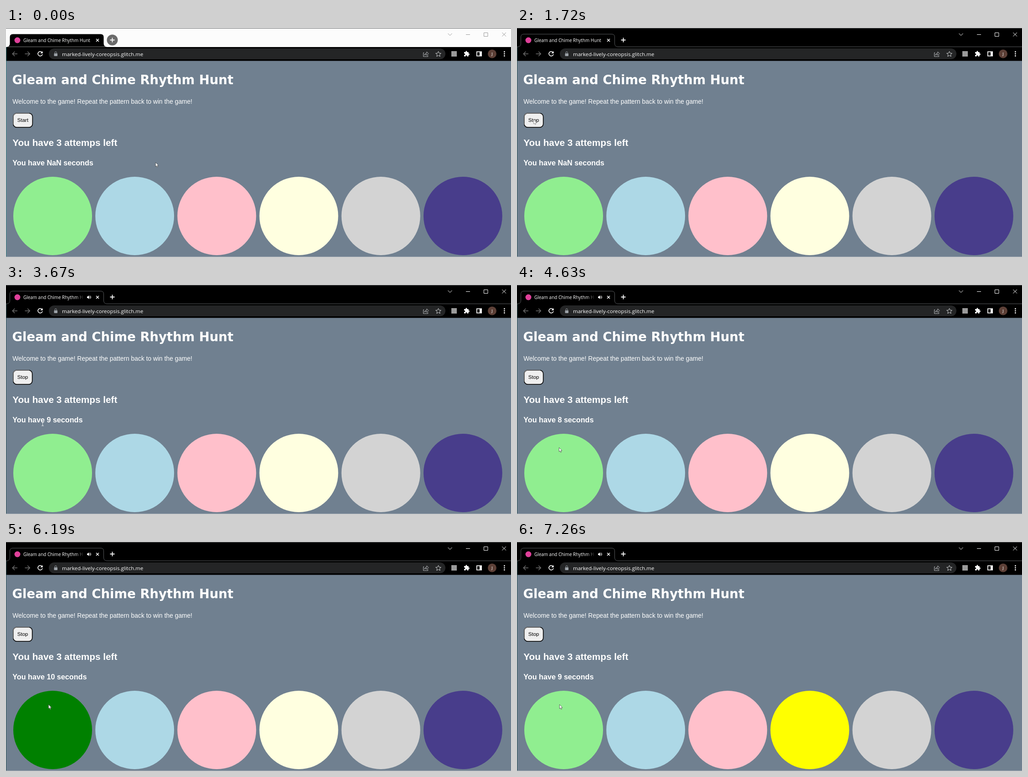
Recreate the animation shown at these times as an HTML page. Size 1109 px wide and 505 px high, loop 8 s.

```html
<!DOCTYPE html>
<html lang="en">
<head>
<meta charset="utf-8">
<title>Gleam and Chime Rhythm Hunt</title>
<style>
  html, body { margin: 0; width: 100%; height: 100%; overflow: hidden; background: #708090; }
  svg { display: block; width: 1109px; height: 505px; }
  text { white-space: pre; }
  .page { font-family: "Liberation Sans", Arial, sans-serif; fill: #fff; }
  .ui { font-family: "Open Sans", "Noto Sans", sans-serif; fill: #fff; }
  .line { fill: none; stroke: #fff; }
</style>
</head>
<body>
<svg viewBox="0 0 1109 505" xmlns="http://www.w3.org/2000/svg">
  <defs>
    <linearGradient id="fade" gradientUnits="userSpaceOnUse" x1="154" x2="171" y1="0" y2="0">
      <stop stop-color="#fff"/><stop offset="1" stop-color="#fff" stop-opacity="0"/>
    </linearGradient>
  </defs>
  <rect width="1109" height="505" fill="#708090"/>

  <!-- title bar -->
  <rect id="bar" width="1109" height="42"/>
  <path id="tab" d="M1 41.5Q8.500 41.500 8.500 34V20Q8.500 13.500 15 13.500H208Q214.500 13.500 214.500 20V34Q214.500 41.500 222 41.500" fill="#000"/>
  <rect width="1109" height="1" fill="#5c5f61"/>
  <circle cx="25" cy="27" r="6.500" fill="#e0409a"/>
  <text id="title" class="ui" x="38" y="30.500" font-size="9.940">Gleam and Chime Rhythm Hunt</text>
  <g id="sound">
    <path d="M178 25.300h2l2.600-2.500v8.400l-2.600-2.500h-2z" fill="#fff"/>
    <path class="line" d="M184 25q1.500 2 0 4M185.200 23.400q3 3.600 0 7.200" stroke-width=".9"/>
  </g>
  <path class="line" d="M198 24l6 6m0-6l-6 6" stroke-width="1.500"/>
  <circle id="disc" cx="233.500" cy="26.500" r="12" fill="#6b6b6b"/>
  <path class="line" d="M228.500 26.500h10m-5-5v10" stroke-width="1.800"/>
  <path id="controls" class="line" d="M970.500 12l4.500 4.500 4.500-4.500M1010 14.500h9M1049.500 10.500h8.500v8h-8.500zM1089.500 10l8.500 8.500m0-8.500l-8.500 8.500"/>

  <!-- toolbar -->
  <rect y="42" width="1109" height="31"/>
  <path id="seam" d="M0 41.500H1M222 41.500H1109" stroke="#55585b"/>
  <path d="M0 72.500H1109" stroke="#3a4048"/>
  <g class="line" stroke-width="1.400">
    <path d="M25 57H14.500m4.700-5l-5 5 5 5M41.500 57H52m-4.700-5l5 5-5 5" stroke="#6f6f6f"/>
    <path d="M79 53.600a5 5 0 1 0 1 4.200" stroke-width="1.600"/>
  </g>
  <path d="M80.500 51v5h-5z" fill="#fff"/>
  <rect x="94" y="45" width="871" height="24" rx="12" fill="#242526"/>
  <rect x="105.500" y="56" width="7.500" height="6" rx="1" fill="#9aa0a6"/>
  <path class="line" d="M107.200 56v-1.800a2 2 0 0 1 4 0V56" style="stroke:#9aa0a6"/>
  <text class="ui" x="123" y="61.500" font-size="11.500">marked-lively-coreopsis.glitch.me</text>
  <path class="line" d="M918 54.500h-1.500v8.500h10v-2.500M919 60q.5-4.500 5-4.500v-3l4 4-4 4v-2.500q-3.500 0-5 2z" style="stroke:#b8bbbe"/>
  <path class="line" d="M949.500 51.500l1.700 3.900 4.200.4-3.200 2.800 1 4.200-3.700-2.300-3.700 2.300 1-4.200-3.200-2.800 4.200-.4z" style="stroke:#d0d2d4"/>
  <rect x="978" y="51" width="12" height="12" fill="#9a9a9a"/>
  <path transform="translate(1004.800 50) scale(.58)" fill="#fff" d="M20.500 11H19V7c0-1.100-.9-2-2-2h-4V3.500a2.500 2.500 0 0 0-5 0V5H4c-1.100 0-2 .9-2 2v3.800h1.500a2.700 2.700 0 0 1 0 5.400H2V20c0 1.100.9 2 2 2h3.800v-1.500a2.700 2.700 0 0 1 5.400 0V22H17c1.100 0 2-.9 2-2v-4h1.500a2.500 2.500 0 0 0 0-5z"/>
  <path fill="#fff" fill-rule="evenodd" d="M1033 51.500h12v11h-12zm1.700 1.700v7.600h5.300v-7.600z"/>
  <circle cx="1067.500" cy="57" r="9.500" fill="#5d4037"/>
  <text class="ui" x="1067.500" y="60.500" font-size="9.500" text-anchor="middle">J</text>
  <g fill="#fff"><circle cx="1094.500" cy="52.500" r="1.400"/><circle cx="1094.500" cy="57" r="1.400"/><circle cx="1094.500" cy="61.500" r="1.400"/></g>

  <!-- page -->
  <g class="page">
    <text x="13.500" y="123.500" font-size="27.500" font-weight="700" style="font-family:'DejaVu Sans',Verdana,sans-serif">Gleam and Chime Rhythm Hunt</text>
    <text x="14.300" y="167" font-size="13.830">Welcome to the game! Repeat the pattern back to win the game!</text>
    <text x="14.300" y="260" font-size="20.740" font-weight="700">You have 3 attemps left</text>
    <text id="timer" x="14.300" y="303" font-size="16.170" font-weight="700"></text>
    <rect id="button" x="15.800" y="187.800" height="31.400" rx="8" fill="#efefef" stroke="#0c0c0c" stroke-width="1.700"/>
    <path d="M16 213V196Q16 188 24 188H51" fill="none" stroke="#767676" stroke-width="1.500"/>
    <text id="label" x="24.800" y="207" font-size="11.520" style="fill:#000"></text>
  </g>
  <g id="lights"></g>
  <path id="edge" d="M.5 42V505"/>
  <path d="M0 504.500H1109" stroke="#a3abb3"/>

  <path id="arrow" d="M.4.400V9.600L2.500 7.800 3.900 11.200 5.400 10.500 4 7.300H6.900Z" fill="#fff" stroke="#3c3c3c" stroke-width=".7"/>
  <path id="beam" class="line" d="M78 302.500h5m-2.500 0v8m-2.500 0h5"/>
</svg>
<script>
const LOOP = 8000;
const $ = id => document.getElementById(id);
const set = (id, attrs) => {
  for (const k in attrs) $(id).setAttribute(k, attrs[k]);
};

// Every track is a list of [start, value...] steps held until the next one.
const pointer = [
  [0, 328, 296], [370, 385, 296], [520, 405, 284], [670, 222, 222], [820, 68, 214],
  [970], [1120, 8, 192], [1270, 36, 202], [2970, 53, 235], [3120, 70, 285],
  [3240], [4500, 84, 330], [4630, 92, 358], [4750, 93, 358]
];
const timer = [
  [0, 'NaN'], [2150, 10], [3120, 9], [4220, 8], [5150, 7], [6190, 10], [7140, 9]
];
const green = [[0, 0], [2720, 1], [3670, 0], [4750, 1], [5300, 0], [6190, 1], [6990, 0]];
const yellow = [[0, 0], [7260, 1]];
const sound = [[0, 0], [2840, .4], [2970, .7], [3120, .9], [3240, 1]];

const at = (track, t) => track.findLast(step => step[0] <= t).slice(1);

const colors = ['lightgreen', 'lightblue', 'pink', 'lightyellow', 'lightgray', 'darkslateblue'];
const lights = colors.map((fill, i) => {
  const c = document.createElementNS('http://www.w3.org/2000/svg', 'circle');
  const attrs = { cx: 102.5 + 180.17 * i, cy: 414.5, r: 86.5, fill };
  for (const k in attrs) c.setAttribute(k, attrs[k]);
  $('lights').append(c);
  return c;
});

function draw(t) {
  const active = t >= 1570;
  set('bar', { fill: active ? '#000' : '#fcfcfc' });
  set('tab', { stroke: active ? '#55585b' : 'none' });
  set('disc', { opacity: active ? 0 : 1 });
  set('seam', { opacity: active ? 1 : 0 });
  set('edge', { stroke: active ? '#34585c' : '#3f8587' });
  $('controls').style.stroke = active ? '#fff' : '#999';

  const [volume] = at(sound, t);
  set('sound', { opacity: volume });
  $('title').style.fill = volume ? 'url(#fade)' : '#fff';

  const started = t >= 1720;
  $('label').textContent = started ? 'Stop' : 'Start';
  set('button', { width: started ? 41.9 : 42.5 });
  $('timer').textContent = `You have ${at(timer, t)[0]} seconds`;
  lights[0].setAttribute('fill', at(green, t)[0] ? 'green' : colors[0]);
  lights[3].setAttribute('fill', at(yellow, t)[0] ? 'yellow' : colors[3]);

  const [x, y] = at(pointer, t);
  set('arrow', {
    opacity: x === undefined ? 0 : 1,
    transform: `translate(${x ?? 0} ${y ?? 0})`,
    stroke: t >= 1270 && t < 2970 ? '#777' : '#3c3c3c'
  });
  set('beam', { opacity: t >= 3240 && t < 4500 ? .8 : 0 });
}

const begin = performance.now();
function tick() {
  draw((performance.now() - begin) % LOOP);
  requestAnimationFrame(tick);
}
tick();
</script>
</body>
</html>
```
